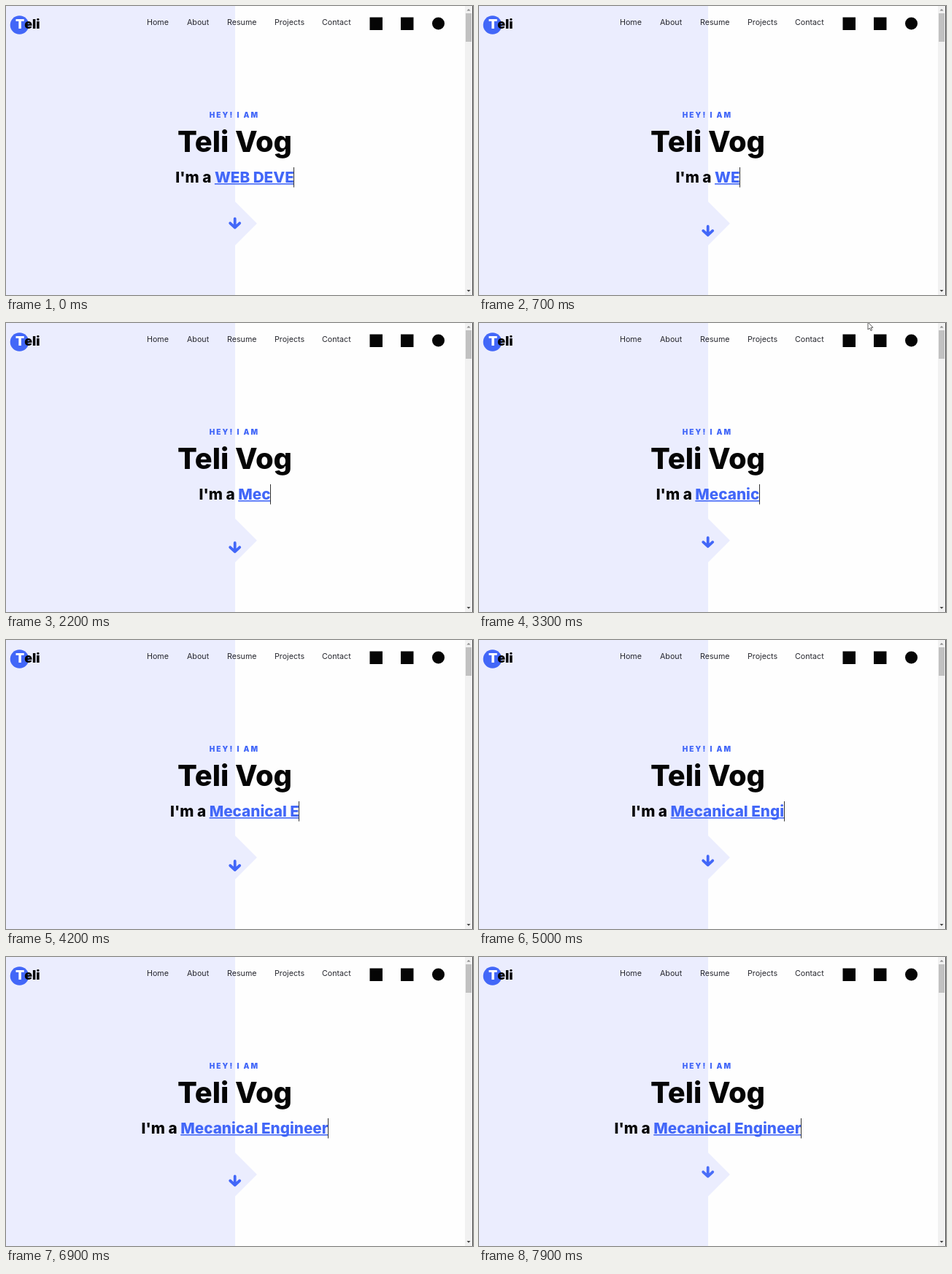
An HTML page with a canvas that plays this animation: 640x396 px, repeating every 8000 ms.

```html
<!DOCTYPE html>
<html lang="en">
<head>
<meta charset="utf-8">
<title>Portfolio hero</title>
<style>
  html, body { margin: 0; width: 100%; height: 100%; overflow: hidden; background: #fff; }
  canvas { display: block; width: 640px; height: 396px; }
</style>
</head>
<body>
<canvas id="stage" width="640" height="396"></canvas>
<script>
const ctx = document.getElementById('stage').getContext('2d');
const LOOP = 8000;
const CENTER = 314;
const BLUE = '#4267f8';
const LAVENDER = '#ebedfe';
const INK = '#050505';
const FONT = 'Inter, "Open Sans", sans-serif';

const NAV = [['Home', 193], ['About', 248], ['Resume', 303], ['Projects', 368], ['Contact', 433]];

function font(size, weight) {
  ctx.font = `${weight} ${size}px ${FONT}`;
}

function text(str, x, y, color, align = 'left') {
  ctx.fillStyle = color;
  ctx.textAlign = align;
  ctx.fillText(str, x, y);
}

function rect(x, y, w, h, color) {
  ctx.fillStyle = color;
  ctx.fillRect(x, y, w, h);
}

function disc(x, y, r, color) {
  ctx.fillStyle = color;
  ctx.beginPath();
  ctx.arc(x, y, r, 0, Math.PI * 2);
  ctx.fill();
}

function polygon(points, color) {
  ctx.fillStyle = color;
  ctx.beginPath();
  points.forEach(([x, y]) => ctx.lineTo(x, y));
  ctx.closePath();
  ctx.fill();
}

// CSS "ease": cubic-bezier(.25, .1, .25, 1)
function ease(x) {
  if (x <= 0) return 0;
  if (x >= 1) return 1;
  const bezier = (a, b, u) => 3 * a * u * (1 - u) ** 2 + 3 * b * u * u * (1 - u) + u ** 3;
  let lo = 0, hi = 1;
  for (let i = 0; i < 24; i++) {
    const mid = (lo + hi) / 2;
    if (bezier(0.25, 0.25, mid) < x) lo = mid; else hi = mid;
  }
  return bezier(0.1, 1, lo);
}

function typedWord(t) {
  if (t < 1500) {
    const left = 8 - Math.floor((t + 50) / 117);
    return 'WEB DEVE'.slice(0, Math.max(0, left));
  }
  const count = Math.floor((t - 1355) / 245);
  return 'Mecanical Engineer'.slice(0, Math.max(0, count));
}

function drawBackdrop() {
  rect(0, 0, 640, 396, '#fefefe');
  rect(0, 0, CENTER, 396, LAVENDER);
  polygon([[CENTER, 268], [344, 298], [CENTER, 328]], LAVENDER);
}

function drawHeader() {
  disc(18.5, 26, 12.8, BLUE);
  font(17.8, 900);
  text('T', 13, 31.3, '#fff');
  text('eli', 13 + ctx.measureText('T').width, 31.3, INK);

  font(10.7, 400);
  NAV.forEach(([label, x]) => text(label, x, 26.3, '#26272e'));

  rect(498.5, 15.5, 17.5, 17.5, INK);
  rect(541, 15.5, 17.5, 17.5, INK);
  disc(592.5, 24, 8.5, INK);
}

function drawTitle() {
  font(10, 900);
  ctx.letterSpacing = '2.1px';
  text('HEY! I AM', 278.7, 152.6, BLUE);
  ctx.letterSpacing = '0px';
  font(39.8, 800);
  text('Teli Vog', CENTER - 0.5, 200, INK, 'center');
}

function drawTypedLine(t) {
  const lead = "I'm a ";
  const word = typedWord(t).trimEnd();
  font(20.7, 800);
  const leadWidth = ctx.measureText(lead).width;
  const wordWidth = ctx.measureText(word).width;
  const x = CENTER - (leadWidth + wordWidth + 1) / 2;
  const end = x + leadWidth + wordWidth;
  text(lead, x, 242, INK);
  text(word, x + leadWidth, 242, BLUE);
  rect(x + leadWidth, 243, wordWidth, 1.6, BLUE);
  rect(Math.floor(end), 221, 1, 27.5, '#333');
}

function drawArrow(t) {
  const phase = ((t + 450) % 1600) / 1600;
  const y = 287.3 + 22 * ease(phase);
  ctx.save();
  ctx.globalAlpha = ease(phase / 0.3);
  ctx.strokeStyle = BLUE;
  ctx.lineWidth = 3.8;
  ctx.lineCap = ctx.lineJoin = 'round';
  ctx.translate(CENTER - 0.3, y);
  ctx.beginPath();
  ctx.moveTo(0, -6.3);
  ctx.lineTo(0, 5);
  ctx.moveTo(-6.5, -0.2);
  ctx.lineTo(0, 5.8);
  ctx.lineTo(6.5, -0.2);
  ctx.stroke();
  ctx.restore();
}

function drawScrollbar() {
  rect(629, 0, 10, 396, '#f1f1f1');
  rect(630, 10, 8, 39, '#c1c1c1');
  polygon([[631.5, 6.5], [634, 4], [636.5, 6.5]], '#858585');
  polygon([[631.5, 389], [636.5, 389], [634, 391.8]], '#444');
  rect(639, 0, 1, 396, '#4a4a4a');
}

function drawPointer(t) {
  if (t < 2800 || t >= 4200) return;
  polygon([[533, -1], [533, 9], [535.3, 7], [537, 10.6], [538.6, 9.8], [537, 6.4], [540, 6.2]], '#fff');
  ctx.strokeStyle = '#333';
  ctx.lineWidth = 0.8;
  ctx.stroke();
}

function frame() {
  const t = performance.now() % LOOP;
  drawBackdrop();
  drawHeader();
  drawTitle();
  drawTypedLine(t);
  drawArrow(t);
  drawScrollbar();
  drawPointer(t);
  requestAnimationFrame(frame);
}
frame();
</script>
</body>
</html>
```
